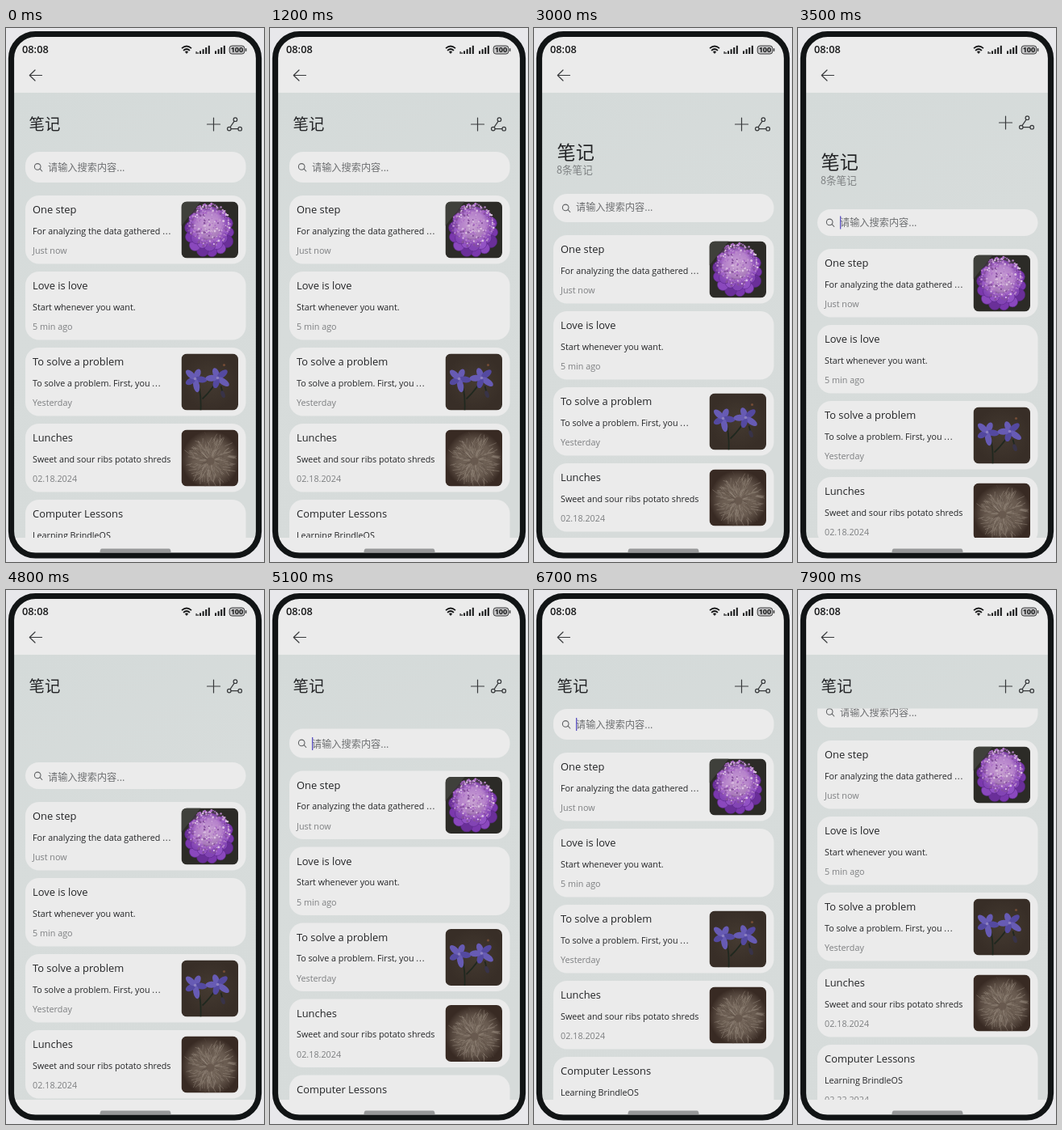
These frames come from a looping animation (320 by 660 pixels, 8 s). An HTML page:

```html
<!DOCTYPE html>
<html lang="zh-CN">
<head>
<meta charset="utf-8">
<title>Notes</title>
<style>
  html, body { margin: 0; width: 100%; height: 100%; overflow: hidden; background: #e8e8eb; }
  svg { display: block; }
  #stage { width: 320px; height: 660px; }
  text { font-family: "Open Sans", "Noto Sans CJK SC", "Noto Sans CJK", sans-serif; fill: #242527; }
  .cjk { font-family: "Noto Sans CJK SC", "Noto Sans CJK", sans-serif; }
  .head { font-size: 12.9px; }
  .body { font-size: 10.75px; }
  .date { font-size: 10.8px; fill: #7d7f81; }
  .dots { letter-spacing: .8px; }
  .line { fill: none; stroke: #37393b; stroke-width: 1.2; stroke-linecap: round; stroke-linejoin: round; }
</style>
</head>
<body>
<svg id="stage" viewBox="0 0 320 660" xmlns="http://www.w3.org/2000/svg">
  <defs>
    <linearGradient id="ground" x2="0.3" y2="1">
      <stop offset="0" stop-color="#d4dad9"/>
      <stop offset="0.5" stop-color="#d7dcdb"/>
      <stop offset="1" stop-color="#d6dbda"/>
    </linearGradient>
    <radialGradient id="dome">
      <stop offset="0" stop-color="#cda6d6"/>
      <stop offset="0.6" stop-color="#b784cb" stop-opacity="0.9"/>
      <stop offset="1" stop-color="#9450bd" stop-opacity="0"/>
    </radialGradient>
    <radialGradient id="soil">
      <stop offset="0" stop-color="#443a31"/>
      <stop offset="1" stop-color="#382e27"/>
    </radialGradient>
    <radialGradient id="fluff">
      <stop offset="0" stop-color="#77695d"/>
      <stop offset="0.6" stop-color="#75675b" stop-opacity="0.8"/>
      <stop offset="1" stop-color="#75675b" stop-opacity="0"/>
    </radialGradient>
    <clipPath id="below"><rect x="10" y="146.5" width="300" height="483.5"/></clipPath>
    <clipPath id="photo"><rect width="70.5" height="70" rx="7"/></clipPath>
  </defs>

  <rect width="320" height="660" fill="#e8e8eb"/>
  <rect x="6.5" y="7.5" width="307" height="644.5" rx="30" fill="#ebebeb"/>
  <rect x="10" y="80" width="300" height="550" fill="url(#ground)"/>

  <g clip-path="url(#below)">
    <g id="search">
      <rect id="field" x="24" width="273.5" fill="#ebebeb"/>
      <path class="line" d="M42.2 2.2L44.8 5M43 -.6A3.8 3.8 0 1 1 35.4 -.6A3.8 3.8 0 1 1 43 -.6" style="stroke:#626466;stroke-width:1.1"/>
      <g id="hint">
        <text class="cjk" x="52" y="4.6" font-size="12.2" style="fill:#6d6f71">请输入搜索内容...</text>
        <rect id="caret" x="52" y="-8" width="1.3" height="16" fill="#5a50c0"/>
      </g>
    </g>
    <g id="list"></g>
  </g>

  <text id="title" class="cjk" x="28.5">笔记</text>
  <text id="count" class="cjk" x="28" font-size="12.6" style="fill:#7d8082">8条笔记</text>
  <g id="tools" class="line">
    <path d="M249.5 119H265.5M257.5 111V127"/>
    <path d="M283 115.3L278 122.6M279.3 124.7H287.8"/>
    <circle cx="284.4" cy="113.2" r="2.3"/>
    <circle cx="276.8" cy="124.6" r="2.3"/>
    <circle cx="290.2" cy="124.7" r="2.3"/>
  </g>

  <text x="20" y="31.2" font-size="12.8" font-weight="600" style="fill:#161718">08:08</text>
  <g fill="none" stroke="#161718" stroke-width="1.7">
    <path d="M218 25.2Q224 19.8 230 25.2M220 27.8Q224 24.2 228 27.8"/>
    <path d="M222.2 29.4L224 31.6L225.8 29.4Q224 28 222.2 29.4Z" fill="#161718" stroke-width=".6"/>
  </g>
  <g id="bars" fill="#161718"></g>
  <rect x="277.2" y="22" width="18.6" height="10" rx="3" fill="#c6c6c7" stroke="#3a3b3c"/>
  <path d="M297.6 25.2V28.8" stroke="#3a3b3c" stroke-width="1.5"/>
  <text x="286.5" y="30.3" font-size="9.2" font-weight="700" text-anchor="middle" style="fill:#161718">100</text>
  <path class="line" d="M44.5 58.5H29.5M36 52L29.3 58.5L36 65"/>

  <path d="M119 643.5H202Q204.5 643.5 204.5 648H116.5Q116.5 643.5 119 643.5" fill="#98999a"/>
  <rect x="6.5" y="7.5" width="307" height="644.5" rx="30" fill="none" stroke="#111415" stroke-width="7.2"/>
</svg>

<script>
const $ = id => document.getElementById(id);
const repeat = (n, draw) => Array.from({ length: n }, (_, i) => draw(i)).join('');

let seed = 7;
const random = () => (seed = seed * 16807 % 2147483647) / 2147483647;
const around = (x, y, r, a) => [x + r * Math.cos(a), y + r * Math.sin(a)].map(v => v.toFixed(1));
const petal = (x, y, turn, length, width, fill) =>
  `<ellipse cx="${length / 2}" rx="${length / 2}" ry="${width}" fill="${fill}" transform="translate(${x} ${y}) rotate(${turn})"/>`;

function pompom() {
  const ring = (n, x, y, r, size, fills) => repeat(n, i => {
    const [cx, cy] = around(x, y, r, i * 6.283 / n);
    return `<circle cx="${cx}" cy="${cy}" r="${size + random() * 2}" fill="${fills[i % fills.length]}" stroke="#5a2587" stroke-width=".6"/>`;
  });
  return '<rect width="71" height="70" fill="#2c2b27"/><path d="M0 0H24L0 30" fill="#3f403b"/>' +
    ring(13, 35, 38, 24, 6, ['#7a38ad', '#6a2f99', '#8a48bd']) +
    ring(12, 35, 36, 18, 6, ['#9252c4', '#8244b4']) +
    '<circle cx="34" cy="29" r="27" fill="url(#dome)"/>' +
    repeat(260, i => {
      const [x, y] = around(34, 29, 27 * Math.sqrt(random()), random() * 6.28);
      return `<circle cx="${x}" cy="${y}" r="${(0.5 + random()).toFixed(1)}" fill="${['#dcc0e2', '#85509c', '#bb8acb', '#a868c4'][i % 4]}"/>`;
    });
}

function bluePair() {
  const bloom = (x, y, turn) =>
    repeat(5, i => petal(x, y, i * 72 + turn, 13 + i % 3 * 2, 3.9, i % 2 ? '#5449a0' : '#675bb4')) +
    `<circle cx="${x}" cy="${y}" r="1.8" fill="#8b80c0"/>`;
  return '<rect width="71" height="70" fill="url(#soil)"/>' +
    '<path d="M18 31Q25 43 24 70M45 32Q37 46 26 56M49 40L52 51" fill="none" stroke="#20281f" stroke-width="1.8"/>' +
    '<circle cx="53" cy="14" r="1.5" fill="#744c35"/>' +
    petal(50, 46, 70, 9, 2.4, '#383348') + bloom(17, 31, -65) + bloom(45, 30, -110);
}

function seedHead() {
  return '<rect width="71" height="70" fill="#382a23"/><circle cx="36" cy="37" r="36" fill="url(#fluff)"/>' +
    repeat(240, i => {
      const a = random() * 6.28, r = 4 + random() * 22;
      const [x1, y1] = around(36, 38, r, a);
      const [x2, y2] = around(36, 38, r + 4 + random() * 6, a + random() * 0.3 - 0.15);
      return `<path d="M${x1} ${y1}L${x2} ${y2}" stroke="${i % 3 ? '#9b8e82' : '#574a40'}" stroke-width=".8" opacity=".55"/>`;
    }) + '<circle cx="36" cy="39" r="5" fill="#5f5147" opacity=".6"/>';
}

const notes = [
  ['One step', 'For analyzing the data gathered …', 'Just now', pompom],
  ['Love is love', 'Start whenever you want.', '5 min ago'],
  ['To solve a problem', 'To solve a problem. First, you …', 'Yesterday', bluePair],
  ['Lunches', 'Sweet and sour ribs potato shreds', '02.18.2024', seedHead],
  ['Computer Lessons', 'Learning BrindleOS', '02.22.2024']
];

$('list').innerHTML = notes.map(([head, body, date, photo], i) => `
  <g transform="translate(0 ${i * 94})">
    <rect x="24" width="273.5" height="84.5" rx="17" fill="#ebebeb"/>
    <text class="head" x="33" y="22.4">${head}</text>
    <text class="body" x="33" y="47.8">${body.replace('…', '<tspan class="dots">...</tspan>')}</text>
    <text class="date" x="33" y="72.2">${date}</text>
    ${photo ? `<g transform="translate(217.5 7.5)" clip-path="url(#photo)">${photo()}</g>` : ''}
  </g>`).join('');

const bar = (x, h, w = 2) => `<rect x="${x}" y="${32 - h}" width="${w}" height="${h}"/>`;
$('bars').innerHTML = bar(235.5, 3, 1.2) + bar(237.5, 2, 1.2) +
  [240, 259].map(x => repeat(4, i => bar(x + i * 3.6, 3.6 + i * 2.2))).join('');

// time, top of the first card, height of the search field, lag of the hint
const steps = [
  [0, 207, 38, 0], [2600, 207, 38, 0], [2700, 229, 38, -3], [2900, 250, 36, -2],
  [3100, 262, 34, -1], [3300, 268, 33, 0], [3400, 268, 33, 0], [3500, 273, 33, 0],
  [4600, 273, 33, 0], [4700, 270, 33, 0], [4800, 262, 33, 1.5], [5000, 236, 35, 1],
  [5200, 211, 37, 0], [5400, 200, 38, 0], [5500, 198, 38, 0], [5800, 199.5, 38, 0],
  [6700, 201, 38, 0], [7400, 201.5, 38, 0], [7800, 201.5, 38, 0], [7900, 186, 38, 0],
  [8000, 186, 38, 0]
];
const caretOn = [[600, 1200], [2000, 2700], [3500, 4100], [4900, 5600], [6400, 7000]];
const within = (t, [from, to]) => t >= from && t < to;

function pose(t) {
  const i = steps.findIndex(step => step[0] > t);
  const a = steps[i - 1], b = steps[i];
  const k = (t - a[0]) / (b[0] - a[0]);
  return a.map((v, n) => v + (b[n] - v) * k);
}

const move = (id, y) => $(id).setAttribute('transform', `translate(0 ${y.toFixed(2)})`);
const show = (node, on) => node.style.display = on ? '' : 'none';

function draw(t) {
  const [, top, height, lag] = pose(t);
  const large = within(t, [2700, 4700]);
  const titleY = large ? 134 + (top - 229) * 0.75 : 118;

  move('list', top);
  move('search', top - 16 - height / 2);
  move('hint', lag);
  $('field').setAttribute('y', -height / 2);
  $('field').setAttribute('height', height);
  $('field').setAttribute('rx', Math.min(17, height / 2));
  show($('caret'), caretOn.some(span => within(t, span)));
  show($('list').lastElementChild, !large);

  $('title').setAttribute('font-size', large ? 23.2 : 19.4);
  $('title').setAttribute('y', titleY + (large ? 7.4 : 7.6));
  show($('count'), large);
  $('count').setAttribute('y', titleY + 26);
  move('tools', within(t, [3500, 4700]) ? -2 : 0);
}

const start = performance.now();
function tick() {
  const t = (performance.now() - start) % 8000;
  draw(Math.floor(t / 100) * 100);
  requestAnimationFrame(tick);
}
tick();
</script>
</body>
</html>
```
